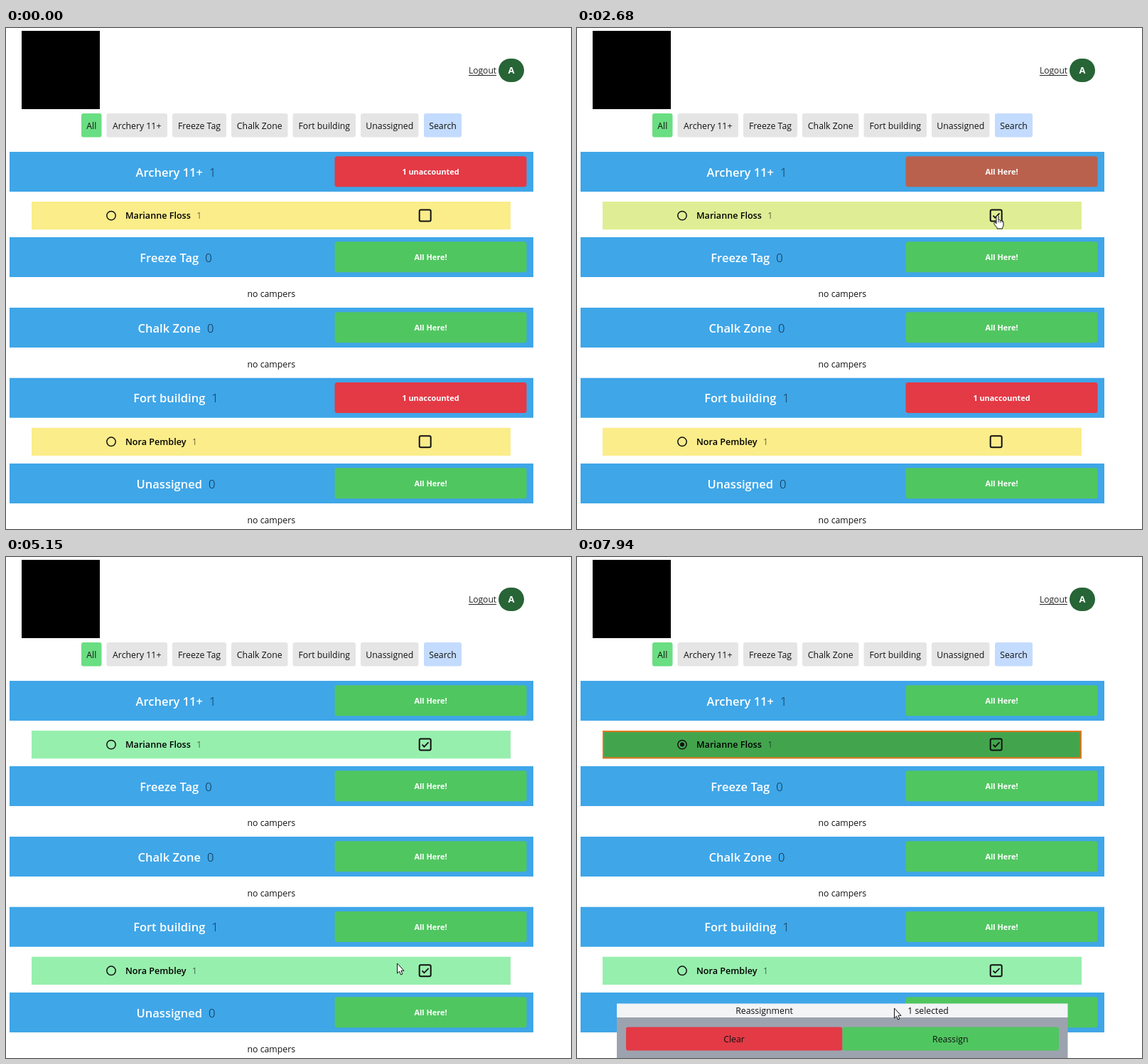
Write an HTML page with a canvas that moves like this. It is 795 by 704 pixels and loops after 8000 ms.

```html
<!DOCTYPE html>
<html lang="en">
<head>
<meta charset="utf-8">
<title>Camper check-in</title>
<style>
html, body { margin: 0; width: 100%; height: 100%; overflow: hidden; background: #fff; }
canvas { display: block; width: 795px; height: 704px; }
</style>
</head>
<body>
<canvas id="stage" width="795" height="704"></canvas>
<script>
const ctx = document.getElementById('stage').getContext('2d');
const LOOP = 8000, STEP = 70;
const FAMILY = '"Open Sans", "Noto Sans", sans-serif';
const RED = [227, 58, 70], GREEN = [80, 198, 96];
const YELLOW = [251, 237, 138], MINT = [151, 239, 173], DARK = [66, 165, 77];
const BLUE = '#3fa6e8', INK = '#111';

// Check times of the two campers, and the time the first is selected
const CHECKED = [2680, 4610], SELECTED = 6640;
const CLICKS = [
  { from: 2550, to: 2680, x: 592, y: 264 },
  { from: 4480, to: 4610, x: 594, y: 581 },
  { from: 6500, to: 6570, x: 149, y: 264 }
];

const TABS = [
  ['All', 106, 134.5, '#6ade82'],
  ['Archery 11+', 141.5, 227, '#e5e5e5'],
  ['Freeze Tag', 234, 310, '#e5e5e5'],
  ['Chalk Zone', 317, 396.5, '#e5e5e5'],
  ['Fort building', 403.5, 492, '#e5e5e5'],
  ['Unassigned', 499, 580.5, '#e5e5e5'],
  ['Search', 588, 641, '#c3dbfe']
];

const GROUPS = [
  { title: 'Archery 11+', y: 174, camper: 'Marianne Floss', id: 0 },
  { title: 'Freeze Tag', y: 294 },
  { title: 'Chalk Zone', y: 393 },
  { title: 'Fort building', y: 491.7, camper: 'Nora Pembley', id: 1 },
  { title: 'Unassigned', y: 612 }
];

// Pointer moves: start, step count, points along the way, shape, step where it becomes `then`
const MOVES = [
  { t: 790, n: 3, pts: [[462, 616], [457, 573], [450, 523]], kind: 'arrow' },
  { t: 1260, n: 5, pts: [[438, 482], [452, 426], [492, 375], [548, 333], [589, 317]], kind: 'arrow', at: 4, then: 'beam' },
  { t: 1740, n: 9, step: 85, pts: [[593, 306], [603, 284], [602, 258], [595, 252], [592, 263]], kind: 'arrow', at: 6, then: 'hand' },
  { t: 3170, n: 12, pts: [[591, 270], [587, 296], [574, 322], [555, 345], [535, 371], [517, 395], [502, 420],
    [492, 443], [495, 490], [520, 540], [570, 577], [597, 589]], kind: 'arrow', at: 11, then: 'hand' },
  { t: 4010, n: 2, pts: [[601, 583], [599, 576]], kind: 'hand' },
  { t: 4280, n: 2, pts: [[597, 578], [597, 580]], kind: 'hand' },
  { t: 5150, n: 9, pts: [[550, 571], [492, 525], [430, 470], [364, 408], [298, 346], [236, 290], [190, 266],
    [161, 256], [151, 253]], kind: 'arrow' },
  { t: 5980, n: 1, pts: [[151, 255]], kind: 'hand' },
  { t: 6240, n: 1, pts: [[149, 262]], kind: 'hand' },
  { t: 7110, n: 10, pts: [[153, 270], [215, 325], [330, 440], [400, 545], [427, 593]], kind: 'arrow' },
  { t: 7940, n: 1, pts: [[446, 634]], kind: 'arrow' }
];

const SHAPES = {
  arrow: new Path2D('M.5 0V14L3.6 11.2L5.6 16L7.9 15L5.9 10.3H10Z'),
  hand: new Path2D('M-2 11V2Q-2 .3-.5 .3T1 2V7Q2.6 5.8 3.6 7.6Q5.2 6.6 6 8.4Q8 7.6 8 10V14Q8 16 6.6 17.5V19H-1V17.5Q-3 15.5-5 12.5Q-5.6 10.6-4.4 10.2T-2 12Z')
};

const mix = (a, b, p) => `rgb(${a.map((v, i) => Math.round(v + (b[i] - v) * p))})`;

// cubic-bezier(.4, 0, .2, 1)
function ease(x) {
  if (x <= 0 || x >= 1) return x <= 0 ? 0 : 1;
  let lo = 0, hi = 1;
  for (let i = 0; i < 20; i++) {
    const s = (lo + hi) / 2, r = 1 - s;
    if (1.2 * s * r * r + .6 * s * s * r + s ** 3 < x) lo = s; else hi = s;
  }
  return 3 * lo * lo * (1 - lo) + lo ** 3;
}

// Colour change of 150 ms, seen in steps
const fade = (t, start) => t < start ? 0 : ease((40 + STEP * Math.floor((t - start) / STEP)) / 150);

function box(x, y, w, h, fill, r = 0) {
  ctx.fillStyle = fill;
  ctx.beginPath();
  ctx.roundRect(x, y, w, h, r);
  ctx.fill();
}

function text(s, x, y, size = 12.3, weight = 400, color = INK, align = 'center') {
  ctx.font = `${weight} ${size}px ${FAMILY}`;
  ctx.fillStyle = color;
  ctx.textAlign = align;
  ctx.fillText(s, x, y);
  return ctx.measureText(s).width;
}

function line(pts, width, color = INK) {
  ctx.strokeStyle = color;
  ctx.lineWidth = width;
  ctx.beginPath();
  pts.forEach(p => ctx.lineTo(...p));
  ctx.stroke();
}

function circle(x, y, r) {
  ctx.beginPath();
  ctx.arc(x, y, r, 0, Math.PI * 2);
}

function header() {
  box(22, 4, 110, 110, '#000');
  const w = text('Logout', 670.5, 64, 12.1, 400, '#222');
  line([[670.5 - w / 2, 66.5], [670.5 + w / 2, 66.5]], 1, '#222');
  box(693, 43, 36, 33, '#276436', 16.5);
  text('A', 711, 64.3, 13, 700, '#fff');
  for (const [label, x, end, fill] of TABS) {
    box(x, 120, end - x, 33.5, fill, 3);
    text(label, (x + end) / 2, 141.6);
  }
}

function camper(name, y, done, picked) {
  box(36, y, 674, 39.3, picked ? mix(MINT, DARK, picked) : mix(YELLOW, MINT, done));
  if (picked) {
    ctx.strokeStyle = '#e4761d';
    ctx.lineWidth = 2;
    ctx.strokeRect(37, y + 1, 672, 37.3);
  }
  const cy = y + 19.6;
  ctx.strokeStyle = ctx.fillStyle = INK;
  ctx.lineWidth = 1.5;
  circle(148, cy, 6.2);
  ctx.stroke();
  if (picked) {
    circle(148, cy, 3);
    ctx.fill();
  }
  const w = text(name, 168, y + 24.3, 12.6, 600, '#000', 'left');
  text('1', 168 + w + 8.5, y + 24.3, 12.3, 300, INK, 'left');
  ctx.strokeStyle = INK;
  ctx.lineWidth = 2;
  ctx.beginPath();
  ctx.roundRect(581.7, cy - 8, 16, 16, 2);
  ctx.stroke();
  if (done) line([[585.5, cy], [588.4, cy + 3], [594.5, cy - 3.2]], 1.8);
}

function group(g, t) {
  const { title, y, camper: name, id } = g;
  box(5, y, 737, 56, BLUE);
  ctx.font = `600 16.5px ${FAMILY}`;
  const w = ctx.measureText(title).width;
  const x = 239 - (w + 18.5) / 2;
  text(title, x, y + 34.5, 16.5, 600, '#fff', 'left');
  text(name ? '1' : '0', x + w + 9, y + 34.5, 16.5, 300, '#0b2b40', 'left');

  const done = name ? fade(t, CHECKED[id]) : 1;
  box(462.5, y + 6.3, 270, 43, mix(RED, GREEN, done), 3.5);
  text(done ? 'All Here!' : '1 unaccounted', 597.5, y + 32, 10.9, 700, '#fff');
  if (name) camper(name, y + 70, done, id === 0 ? fade(t, SELECTED) : 0);
  else text('no campers', 373.3, y + 84);
}

function panel() {
  box(56, 627.5, 634.5, 19.5, '#f2f4f6');
  box(56, 647, 634.5, 57, '#9ca3af');
  text('Reassignment', 263.5, 642.3);
  text('1 selected', 494, 642.3);
  box(69, 660.5, 304.5, 33, mix(RED, RED, 0), 3);
  box(373.5, 660.5, 304.5, 33, mix(GREEN, GREEN, 0), 3);
  text('Clear', 221, 681.8);
  text('Reassign', 525.3, 681.8);
}

function pointer(t) {
  const m = MOVES.filter(v => v.t <= t).pop();
  if (!m) return;
  const i = Math.min(m.n - 1, Math.floor((t - m.t) / (m.step || STEP)));
  const u = m.n > 1 ? i / (m.n - 1) * (m.pts.length - 1) : 0;
  const k = Math.floor(u), a = m.pts[k], b = m.pts[k + 1] || a;
  const x = Math.round(a[0] + (b[0] - a[0]) * (u - k));
  const y = Math.round(a[1] + (b[1] - a[1]) * (u - k));
  const kind = i >= m.at ? m.then : m.kind;

  if (kind === 'beam') {
    line([[x + .5, y - 6], [x + .5, y + 7]], 1, '#665568');
    for (const dy of [-6.5, 7.5]) line([[x - 2, y + dy], [x + 3, y + dy]], 1, '#665568');
    return;
  }
  ctx.save();
  ctx.translate(x, y);
  ctx.fillStyle = '#fff';
  ctx.strokeStyle = '#111';
  ctx.lineWidth = 1;
  ctx.lineJoin = 'round';
  ctx.fill(SHAPES[kind]);
  ctx.stroke(SHAPES[kind]);
  if (kind === 'hand') for (const dx of [1, 3.6, 6]) line([[dx, 7.5], [dx, 10.5]], .8);
  ctx.restore();
}

function draw(t) {
  ctx.fillStyle = '#fff';
  ctx.fillRect(0, 0, 795, 704);
  header();
  GROUPS.forEach(g => group(g, t));
  if (t >= SELECTED) panel();
  for (const c of CLICKS) {
    if (t < c.from || t >= c.to) continue;
    ctx.fillStyle = 'rgba(248, 240, 20, .72)';
    circle(c.x, c.y, 10);
    ctx.fill();
  }
  pointer(t);
}

const begin = performance.now();
function tick() {
  draw((performance.now() - begin) % LOOP);
  requestAnimationFrame(tick);
}
tick();
</script>
</body>
</html>
```
